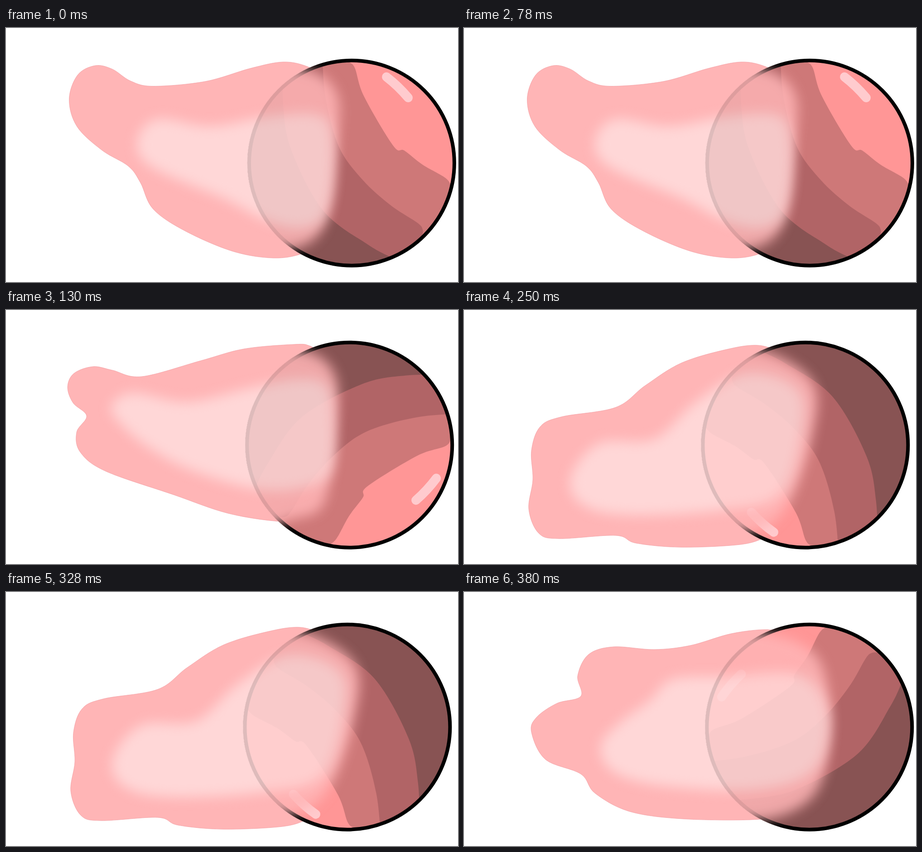
Recreate the animation shown at these times as an HTML page. Size 998 by 561 pixels, loop 500 ms.

```html
<!DOCTYPE html>
<html lang="en">
<head>
<meta charset="utf-8">
<title>Rolling fireball</title>
<style>
  html, body { margin: 0; width: 100%; height: 100%; overflow: hidden; background: #fff; }
  svg { display: block; width: 100%; height: 100%; }
</style>
</head>
<body>
<svg id="stage" viewBox="0 0 998 561">
  <defs>
    <filter id="soft" x="-20%" y="-20%" width="140%" height="140%" color-interpolation-filters="sRGB">
      <feGaussianBlur stdDeviation="14"/>
    </filter>
    <clipPath id="inside"><circle r="225"/></clipPath>
    <clipPath id="rim"><circle r="231"/></clipPath>
  </defs>
</svg>
<script>
const stage = document.getElementById('stage');
const LOOP = 500;
const STEP_ANGLE = 89;
const BALL_X = 763.4, BALL_Y = 298.2;
const FLAME = '#ffb5b6', GLOW = '#ffd7d7';

// Key points. tail: sharp outline, core: pale glow, edge: where the flame fades out on the ball
const poses = [
  {
    until: 130, cx: BALL_X,
    tail: '705,110 665,85 612,75 540,89 440,118 325,128.5 275,117 235,91 197,83 158,104 139.5,158 157,218 212,270 270,305 297,342 325,400 395,448 500,493 590,508 655,498 700,470',
    core: '290,248 335,201 450,217 570,197 680,190 718,225 722,340 700,420 645,442 570,423 480,376 320,306',
    edge: '732,150 724,300 700,440 630,488'
  },
  {
    until: 250, cx: 758.7,
    tail: '705,100 670,79 635,76 525,86 430,112 300,147 235,133 192,125 150,140 136,170 148,205 178,234 156,270 164,314 220,356 370,408 490,449 605,467 660,460',
    core: '232,213 280,183 400,203 540,172 640,153 705,165 724,240 715,360 640,395 540,393 400,350 310,300 255,253',
    edge: '728,150 722,300 700,430 630,462'
  },
  {
    until: 380, cx: 753.9,
    tail: '705,95 650,78 580,87 480,117 400,167 335,215 215,236 168,258 149,310 152,375 143,440 165,493 210,505 335,498 380,515 480,524 610,518 665,502 700,480',
    core: '237,365 300,294 420,285 510,205 620,140 725,165 750,240 700,405 560,443 350,452 255,425',
    edge: '770,160 768,280 715,430 640,488'
  },
  {
    until: LOOP, cx: 762.8,
    tail: '710,95 670,83 590,92 500,118 420,127 330,121 275,138 251,185 258,230 205,246 160,277 149,310 180,370 258,402 290,445 370,486 500,502 665,501 700,480',
    core: '302,340 345,288 410,240 460,193 570,187 740,183 805,270 775,390 650,436 440,428 330,397',
    edge: '780,145 807,300 775,445 660,503'
  }
];

// Ball shading, from the dark side to the lit side, in upright ball position
const bands = [
  ['#b16466', '612,60 612,170 630,270 700,403 800,479 858,510'],
  ['#ce7878', '698,40 705,150 735,262 788,336 850,392 908,430 920,445 919,459'],
  ['#ff9696', '742,74 768,84 790,150 855,260 880,271 920,302 970,331 984,350']
];

const parse = list => list.split(' ').map(pair => pair.split(',').map(Number));

// Catmull-Rom spline as an SVG path
function spline(list, closed) {
  const pts = parse(list), n = pts.length;
  const at = i => closed ? pts[(i + n) % n] : pts[Math.max(0, Math.min(n - 1, i))];
  let d = `M${pts[0]}`;
  for (let i = 0; i < (closed ? n : n - 1); i++) {
    const [a, b, c, e] = [at(i - 1), at(i), at(i + 1), at(i + 2)];
    const out = b.map((v, k) => v + (c[k] - a[k]) / 6);
    const into = c.map((v, k) => v - (e[k] - b[k]) / 6);
    d += `C${out} ${into} ${c}`;
  }
  return d;
}

const softBlob = (list, fill) => `<path d="${spline(list, true)}" fill="${fill}" filter="url(#soft)"/>`;

const band = ([fill, list]) =>
  `<path d="${spline(list)}H1100V0H${parse(list)[0][0]}Z" fill="${fill}"/>`;

const texture = bands.map(band).join('') +
  '<path d="M840,108Q866,128 888,154" fill="none" stroke="#ffcbce" stroke-width="20" stroke-linecap="round"/>';

function drawPose({ cx, tail, core, edge }, turn) {
  const glow = softBlob(core, GLOW);
  const front = softBlob(`430,290 490,90 655,89 ${edge} 530,475`, FLAME);
  return `<g visibility="hidden">
    <path d="${spline(tail)}" fill="${FLAME}" stroke="#f0979c" stroke-width=".7"/>${glow}
    <g transform="translate(${cx},${BALL_Y})">
      <circle r="226" fill="#885353"/>
      <g clip-path="url(#inside)">
        <g transform="rotate(${turn * STEP_ANGLE}) translate(${-BALL_X},${-BALL_Y})">${texture}</g>
      </g>
      <circle r="226.5" fill="none" stroke="#000" stroke-width="8"/>
      <g clip-path="url(#rim)" opacity=".87">
        <g transform="translate(${-cx},${-BALL_Y})">${front}${glow}</g>
      </g>
    </g>
  </g>`;
}

stage.insertAdjacentHTML('beforeend', poses.map(drawPose).join(''));
const layers = [...stage.children].slice(1);
const start = performance.now();

function render() {
  const time = (performance.now() - start) % LOOP;
  const current = poses.findIndex(pose => time < pose.until);
  layers.forEach((layer, i) => layer.setAttribute('visibility', i === current ? 'visible' : 'hidden'));
  requestAnimationFrame(render);
}
render();
</script>
</body>
</html>
```
